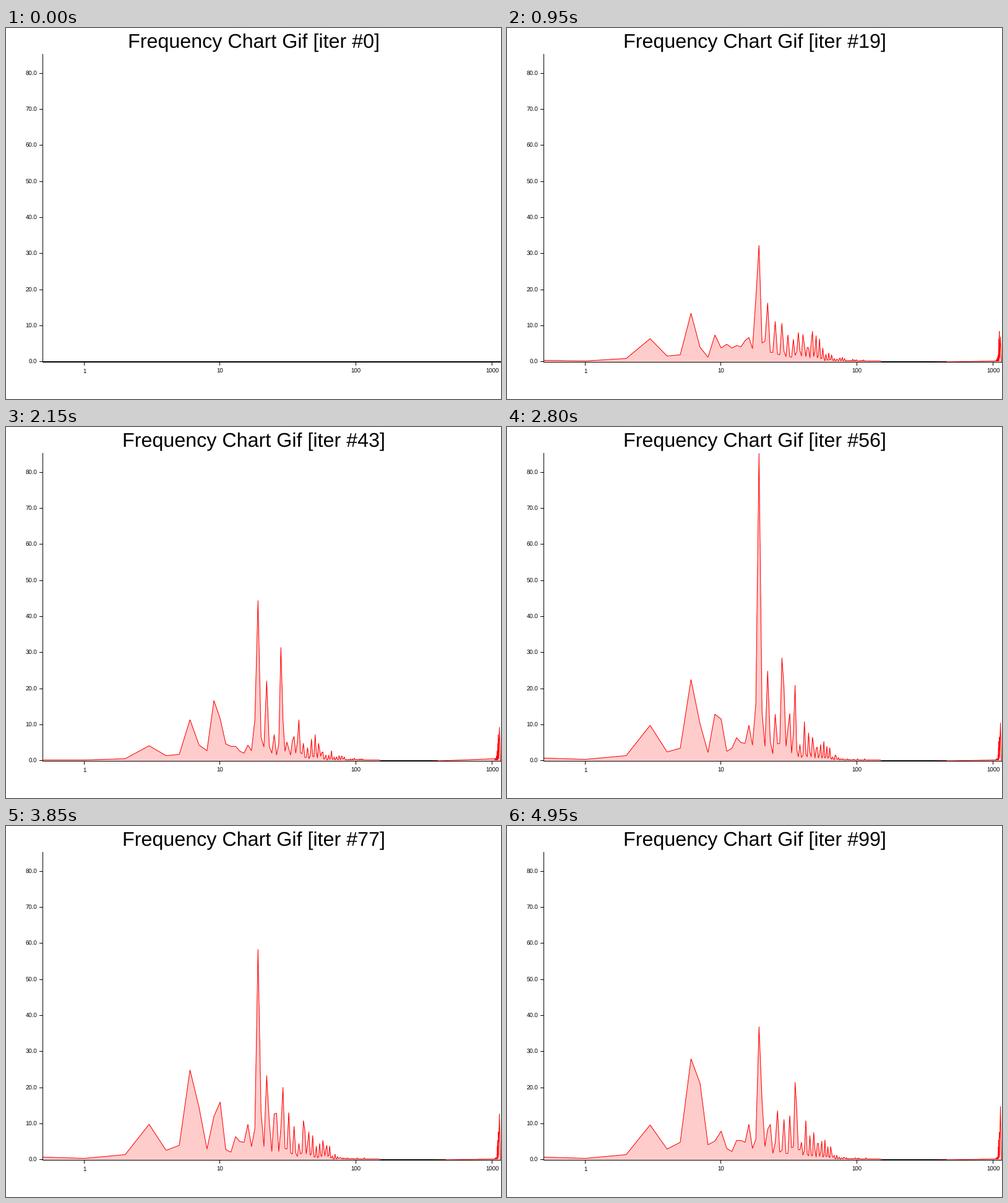
A matplotlib script that plays this animation: 800x600 px, repeating every 5000 ms.

```python
import numpy as np
import matplotlib.pyplot as plt
from matplotlib.animation import FuncAnimation
from matplotlib.patches import Polygon, Rectangle

plt.rcParams["font.family"] = "Liberation Sans"
plt.rcParams["path.simplify"] = False
plt.rcParams["text.hinting"] = "none"

W, H, DPI = 800, 600, 100
PX = 72 / DPI
FRAMES, STEP = 100, 50
LEFT, TOP, BASE = 60, 42, 540
UNIT = 5.828            # pixels per unit of amplitude
DECADE = 219.6          # pixels per factor of ten
PEAK = 85.3
MIRROR = 1162           # bins repeat backwards from here

BINS = np.arange(350)
HARMONICS = np.arange(1, 37)

# Heights of the leading harmonics at a few moments.
MOMENTS = [10, 28, 43, 56, 77, 99]
LEADERS = {
    2: [15, 12, 11.4, 22.5, 25, 28],
    3: [4.3, 10.6, 16.7, 13, 16, 8],
    6: [26.2, 38.6, 44.6, PEAK, 58.5, 37],
    7: [16.3, 16.6, 22.3, 25, 23.5, 9.8],
    9: [7.5, 14, 31.5, 28.5, 20.2, 11.2],
    11: [5.9, 6.6, 6.7, 21, 9.3, 21.6],
}

rng = np.random.default_rng(7)
bin_phase = rng.uniform(0, 2 * np.pi, BINS.size)
bin_gain = rng.uniform(0.6, 1.4, BINS.size)
tone_phase = rng.uniform(0, 2 * np.pi, HARMONICS.size)


def wobble(i, phase):
    return np.exp(0.5 * np.sin(phase + 0.3 * i))


def floor_noise(i):
    """Broad hump around bin 12 with a low shelf up to bin 150."""
    hump = 3 * np.exp(-(np.log(np.maximum(BINS, 0.5) / 12) / 1.2) ** 2)
    hump += 0.6 * np.exp(-BINS / 3)
    hump[BINS >= 125] = 0
    shelf = np.where(BINS < 150, 0.2, 0)
    return np.maximum(hump * bin_gain * wobble(i, bin_phase), shelf)


def tone_heights(i):
    heights = np.where(HARMONICS < 8, 6,
                       8 * np.exp(-((HARMONICS - 8) / 10) ** 2) + 0.4)
    heights = heights * wobble(i, tone_phase)
    for n, track in LEADERS.items():
        heights[n - 1] = np.interp(i, MOMENTS, track)
    return heights


def spectrum(i):
    """Harmonics of a slowly rising pitch over the noise floor."""
    centre = HARMONICS * (3.08 + 0.0014 * i)
    offset = BINS[:, None] - centre
    lobes = 1 / (1 + (offset / 0.45) ** 2)
    lobes = lobes / lobes.max(axis=0) * tone_heights(i)
    lobes[BINS > 125] = 0
    fade = min(1, i / 10)
    return fade * np.maximum(lobes.max(axis=1), floor_noise(i))


def x_pix(k):
    return 126.5 + DECADE * np.log10(np.maximum(k, 0.5))


def y_pix(v):
    return np.floor(BASE - v * UNIT) + 0.5


def curve(i):
    amp = spectrum(i)
    back = np.arange(110, 44, -1)
    spike = min(1, i / 10) * (5 + 0.1 * i)
    x = np.concatenate([x_pix(BINS), x_pix(MIRROR - back),
                        796.5 + np.arange(4)])
    v = np.concatenate([amp, amp[back],
                        spike * np.array([0.4, 1, 0.4, 0])])
    x[0] = LEFT
    return x, y_pix(v)


fig = plt.figure(figsize=(W / DPI, H / DPI), dpi=DPI, facecolor="white")
ax = fig.add_axes([0, 0, 1, 1])
ax.set_xlim(0, W)
ax.set_ylim(H, 0)
ax.axis("off")


def bar(x, y, w, h, z=5):
    ax.add_patch(Rectangle((x, y), w, h, fc="black", lw=0,
                           antialiased=False, zorder=z))


def label(x, y, s, size, ha="center"):
    return ax.text(x, y, s, fontsize=size * PX, color="black", ha=ha,
                   va="baseline", zorder=6)


bar(LEFT - 1, TOP, 1, BASE - TOP + 1)
bar(LEFT, BASE, W - LEFT, 1)
bar(LEFT, BASE - 1, W - LEFT, 1, z=1)
for n in range(9):
    y = int(BASE - 0.4 - 10 * n * UNIT)
    bar(LEFT - 6, y, 6, 1)
    label(50.5, y + 4, f"{10 * n:.1f}", 9.68, "right")
for n in range(4):
    x = int(126.2 + DECADE * n)
    bar(x, BASE, 1, 6)
    label(x + 0.5, 558, str(10 ** n), 9.68)

title = label(W / 2, 31, "", 32.26)
area = ax.add_patch(Polygon([(LEFT, BASE), (W, BASE), (W, BASE)], fc="#ffcccc",
                            lw=0, antialiased=False, zorder=2))
line, = ax.plot([], [], color="red", lw=PX, solid_joinstyle="bevel",
                solid_capstyle="butt", snap=False, zorder=3)


def draw(i):
    x, y = curve(i)
    outline = np.column_stack([x, y])
    area.set_xy(np.vstack([(LEFT, BASE + 0.5), outline, (W, BASE + 0.5)]))
    line.set_data(x, y)
    title.set_text(f"Frequency Chart Gif [iter #{i}]")
    return area, line, title


anim = FuncAnimation(fig, draw, frames=FRAMES, interval=STEP, repeat=True,
                     repeat_delay=0)
plt.show()
```
